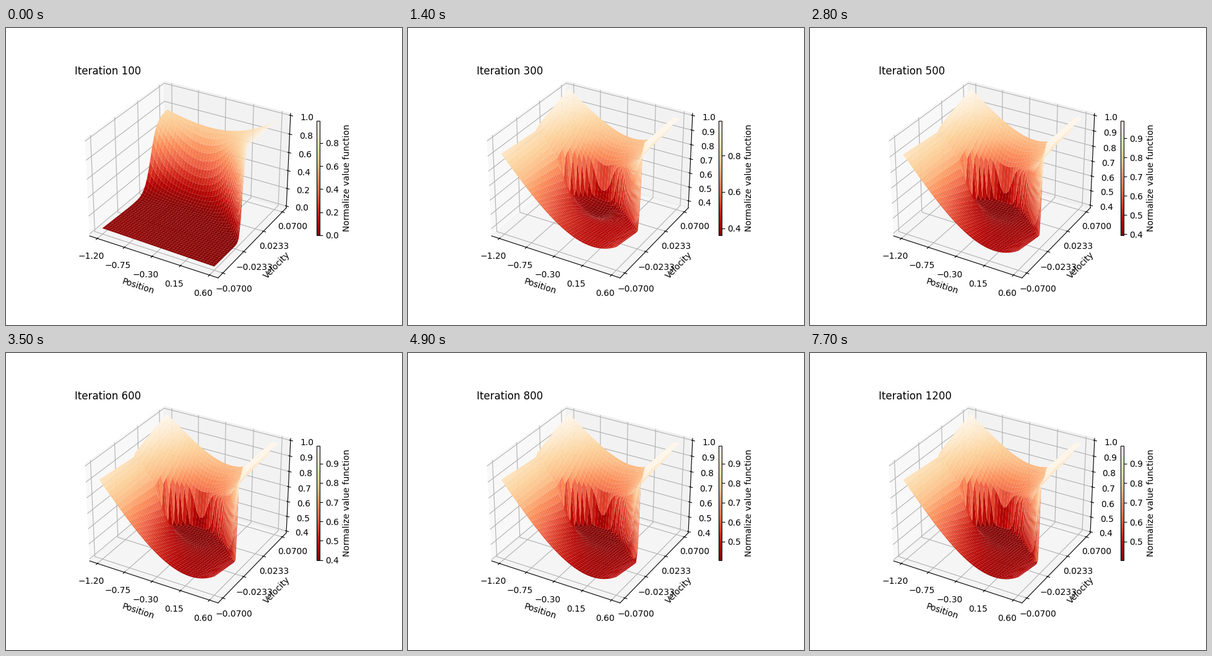
Animation of 640 by 480 pixels, one loop 8 s. Source, as a matplotlib script:

```python
import numpy as np
import matplotlib.pyplot as plt
from matplotlib.animation import FuncAnimation

N = 40
STEP = 7  # ticks of 100 ms that each iteration stays on screen
P_RANGE, V_RANGE = (-1.2, 0.6), (-0.07, 0.07)
PUSH, GRAVITY = 0.001, 0.0025

S, Q = np.meshgrid(np.linspace(0, 1, N), np.linspace(0, 1, N))
P = P_RANGE[0] + 1.8 * S
V = V_RANGE[0] + 0.14 * Q


def sigmoid(x):
    return 1 / (1 + np.exp(-x))


def cubic(a, b, c, d):
    """Cubic across the positions through four evenly spaced heights."""
    return np.polyval(np.polyfit([0, 1 / 3, 2 / 3, 1], [a, b, c, d], 3), S)


def potential(p):
    """Energy of the car on the hill under a constant push right."""
    return GRAVITY / 3 * np.sin(3 * p) - PUSH * p


def separatrix():
    """Velocity (0..1) above which pushing right reaches the goal."""
    crest = np.arccos(PUSH / GRAVITY) / 3
    gap = np.clip(potential(crest) - potential(P), 0, None)
    return 0.5 + np.where(P < crest, 1, -1) * np.sqrt(2 * gap) / 0.14


def early_surface():
    """Only the fast half of the states has received any value."""
    top = cubic(0.77, 0.70, 0.745, 0.975)
    mid = cubic(0.73, 0.87, 0.785, 0.43)
    width = cubic(0.05, 0.065, 0.05, 0.015)
    rise = sigmoid((Q - mid) / width) / sigmoid((1 - mid) / width)
    floor = (0.045 - 0.025 * S) * (1 - Q)
    return floor + (top - floor) * rise


def late_surface(k, pit):
    rim = separatrix() - 0.005 * (k - 1) * S ** 2

    # states that reach the goal directly
    t = np.clip((Q - rim) / (1 - rim), 0, 1)
    drop = cubic(0.097, 0.19, 0.10, 0)
    upper = cubic(0.997, 0.83, 0.775, 0.985) - drop * (1 - t) ** 1.2
    upper = np.where((P >= 0.5) & (V >= 0), 0.99, upper)

    # states that must swing left first
    front = cubic(0.905, 0.64, 0.475, 0.51)
    turn = S + 1.5 * np.clip(Q - 0.5, 0, None)
    middle = 0.412 + 0.04 * S ** 3 + 0.49 * sigmoid((0.22 - turn) / 0.07)
    bowl = np.exp(-((S - 0.52) / 0.17) ** 2 - ((Q - 0.6) / 0.17) ** 2)
    lower = front + (middle - front) * np.clip(2 * Q, 0, 1)
    lower -= (pit + 0.007) * bowl

    wall = sigmoid((Q - rim) / (0.004 + 0.05 * pit))
    return lower + (upper - lower) * wall


def state(k):
    """Values and their lowest level for step k."""
    if k == 0:
        return early_surface(), 0.0
    pit = 0.086 * 0.5 ** (k - 1)
    low = 0.405 - pit
    return np.clip(late_surface(k, pit), low, 1), low


def widen(lo, hi, margin):
    pad = (hi - lo) * margin
    return lo - pad, hi + pad


def draw(k):
    fig.clear()
    ax = fig.add_subplot(projection="3d")
    z, low = state(k)
    surf = ax.plot_surface(P, V, z, cmap="OrRd_r", rcount=N, ccount=N,
                           vmin=low, vmax=0.992)
    ax.set_xticks(np.linspace(*P_RANGE, 5))
    ax.set_yticks(np.linspace(*V_RANGE, 4))
    ax.set_xlim(*widen(*widen(*P_RANGE, 0.05), 1 / 48))
    ax.set_ylim(*widen(*widen(*V_RANGE, 0.05), 1 / 48))
    ax.set_zlim(*widen(low, 1, 1 / 48))
    ax.set_xlabel("Position")
    ax.set_ylabel("Velocity")
    bar = fig.colorbar(surf, shrink=0.5, aspect=35)
    bar.set_label("Normalize value function")
    fig.text(110.6 / 640, 405 / 480, f"Iteration {100 * (k + 1)}", fontsize=12)


shown = {"k": None}


def update(frame):
    k = frame // STEP
    if shown["k"] != k:
        draw(k)
        shown["k"] = k
    return []


fig = plt.figure(figsize=(6.4, 4.8), dpi=100)
anim = FuncAnimation(fig, update, frames=80, interval=100, repeat=True,
                     repeat_delay=0, blit=False)
plt.show()
```
